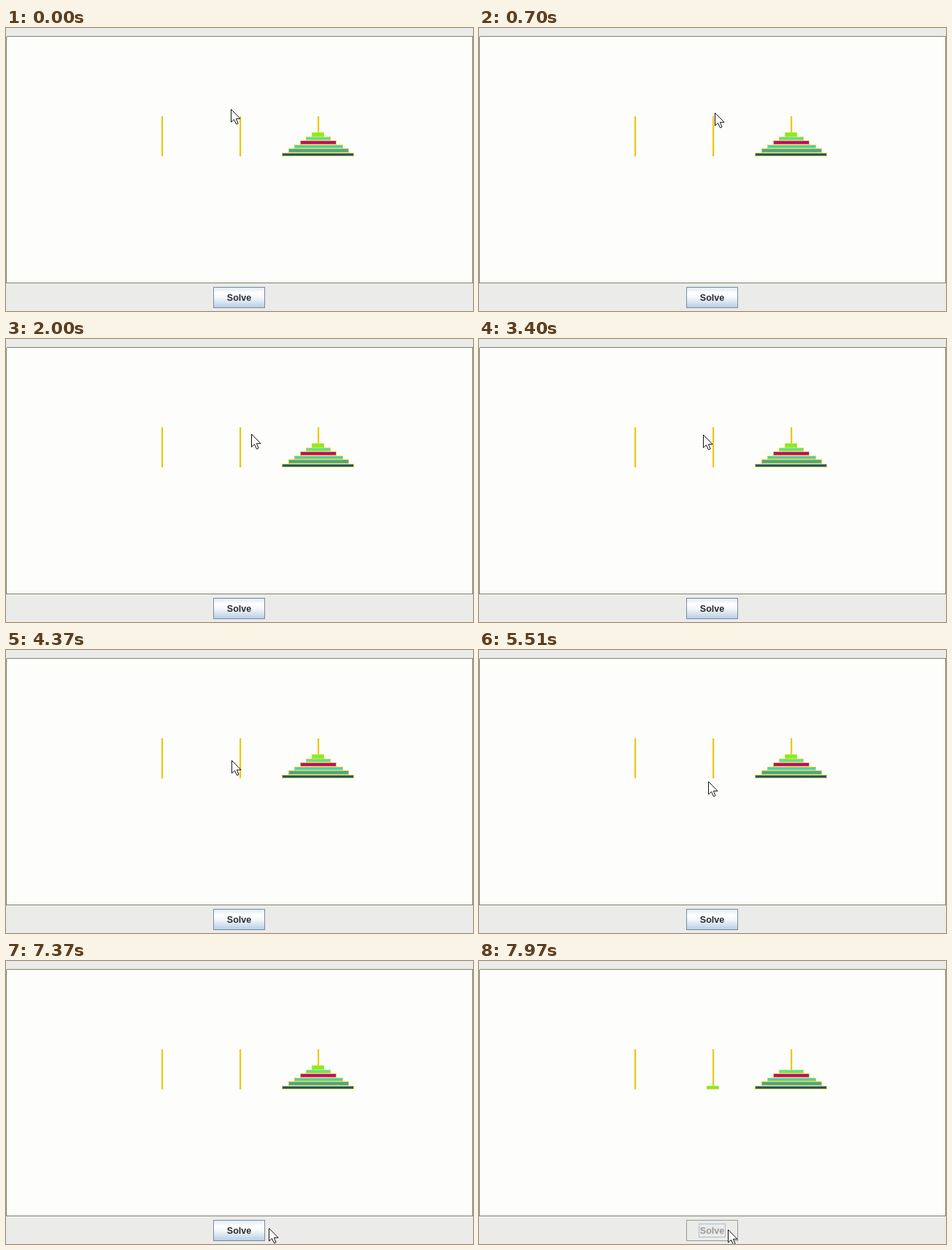
An HTML page with a canvas that plays this animation: 640 px wide and 388 px high, repeating every 8000 ms.

```html
<!DOCTYPE html>
<html lang="en">
<head>
<meta charset="utf-8">
<title>Towers of Hanoi</title>
<style>
  html, body { margin: 0; width: 100%; height: 100%; overflow: hidden; background: #ebebea; }
  canvas { display: block; width: 100vw; height: 100vh; }
</style>
</head>
<body>
<canvas id="stage" width="640" height="388"></canvas>
<script>
const ctx = document.getElementById('stage').getContext('2d');
const LOOP = 8000;
const CLICK = 7760;

const PANEL = '#ebebea';
const PEG_GAP = 107;
const FIRST_PEG = 214;
const PEG_TOP = 121;
const FLOOR = 176;
const DISC_H = 5.5;
// smallest disc first
const DISCS = ['#6cfa20', '#52e694', '#bc0c74', '#42d2bc', '#46a890', '#205878'];

// pointer stops, with an eased glide between each pair
const STOPS = [
  { t: 0, x: 308, y: 111 },
  { t: 870, x: 325, y: 117 },
  { t: 1130, x: 354, y: 191 },
  { t: 2100, x: 335, y: 128 },
  { t: 3200, x: 335, y: 225 },
  { t: 3420, x: 306, y: 129 },
  { t: 5510, x: 314, y: 180 },
  { t: 6740, x: 586, y: 337 },
  { t: 7500, x: 341, y: 368 }
];
const ARROW = new Path2D('M0 0V17.5L4 13.8L7 20.3L9.6 19.2L6.8 12.8H12.5Z');

const pegX = i => FIRST_PEG + i * PEG_GAP;
const mix = (a, b, u) => a + (b - a) * u;

function pointerAt(t) {
  const next = STOPS.findIndex(s => s.t > t);
  if (next < 0) return STOPS[STOPS.length - 1];
  const a = STOPS[next - 1], b = STOPS[next];
  const u = (t - a.t) / (b.t - a.t);
  const ease = u * u * (3 - 2 * u);
  return { x: mix(a.x, b.x, ease), y: mix(a.y, b.y, ease) };
}

function rect(x, y, w, h, color) {
  ctx.fillStyle = color;
  ctx.fillRect(x, y, w, h);
}

function frame(x, y, w, h, color) {
  ctx.strokeStyle = color;
  ctx.lineWidth = 1;
  ctx.strokeRect(x + 0.5, y + 0.5, w - 1, h - 1);
}

function drawPanel() {
  rect(0, 0, 640, 388, PANEL);
  rect(0, 11, 640, 339, '#fdfdfc');
  frame(0, 11, 640, 339, '#80826a');
  rect(0, 11, 1, 1, PANEL);
}

function drawPeg(x) {
  rect(x - 1, PEG_TOP, 2, FLOOR - PEG_TOP, '#ecc61c');
  rect(x + 1, PEG_TOP, 1, FLOOR - PEG_TOP, '#fbf3bc');
}

function drawDisc(size, peg, level) {
  const half = 8.2 * (size + 1);
  const left = Math.floor(pegX(peg) - half);
  const width = Math.round(2 * half) + 1;
  const top = Math.round(FLOOR - DISC_H * (level + 1));
  const height = Math.round(FLOOR - DISC_H * level) - top;
  rect(left, top, width, height, '#dcd048');
  rect(left + 1, top + 1, width - 2, height - 2, DISCS[size]);
}

function drawButton(enabled) {
  if (enabled) {
    const shade = ctx.createLinearGradient(0, 355, 0, 383);
    shade.addColorStop(0, '#dde8f3');
    shade.addColorStop(0.3, '#ffffff');
    shade.addColorStop(0.5, '#f6f9fc');
    shade.addColorStop(1, '#b8cfe5');
    ctx.fillStyle = shade;
    ctx.fillRect(284, 355, 71, 29);
  }
  frame(284, 355, 71, 29, enabled ? '#7a8a99' : '#999999');
  if (!enabled) frame(301, 360, 37, 19, '#a9bccf');
  ctx.font = 'bold 12.5px "Liberation Sans", Arial, sans-serif';
  ctx.textAlign = 'center';
  ctx.fillStyle = enabled ? '#2a2a2a' : '#999999';
  ctx.fillText('Solve', 319.5, 374);
}

function drawPointer({ x, y }) {
  ctx.save();
  ctx.translate(Math.round(x) + 0.5, Math.round(y) + 0.5);
  ctx.fillStyle = '#ffffff';
  ctx.fill(ARROW);
  ctx.strokeStyle = '#101010';
  ctx.lineWidth = 1;
  ctx.stroke(ARROW);
  ctx.restore();
}

function draw(t) {
  const solving = t >= CLICK;
  drawPanel();
  for (let i = 0; i < 3; i++) drawPeg(pegX(i));
  DISCS.forEach((_, size) => {
    const moved = solving && size === 0;
    drawDisc(size, moved ? 1 : 2, moved ? 0 : DISCS.length - 1 - size);
  });
  drawButton(!solving);
  drawPointer(pointerAt(t));
}

const start = performance.now();
function tick() {
  draw((performance.now() - start) % LOOP);
  requestAnimationFrame(tick);
}
tick();
</script>
</body>
</html>
```
